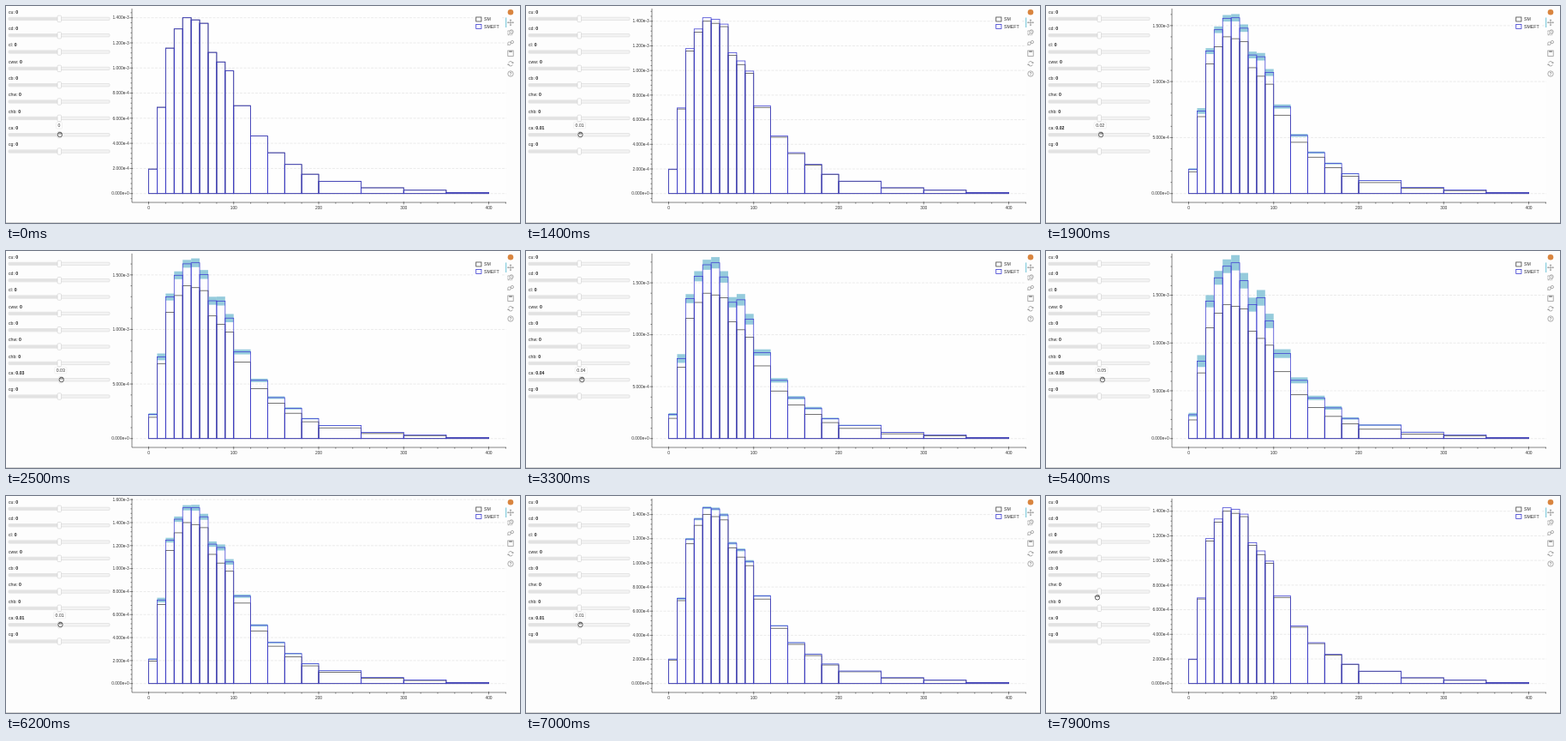
An HTML page with a canvas that plays this animation: 600 px wide and 253 px high, repeating every 8 s.

```html
<!DOCTYPE html>
<html lang="en">
<head>
<meta charset="utf-8">
<title>Coefficient sliders</title>
<style>
html, body { margin: 0; width: 100%; height: 100%; overflow: hidden; background: #fdfdfd; }
canvas { display: block; width: 600px; height: 253px; }
</style>
</head>
<body>
<canvas id="stage"></canvas>
<script>
const W = 600, H = 253, LOOP = 8000;
const FONT = '"Liberation Sans", Arial, sans-serif';
const canvas = document.getElementById('stage');
const ctx = canvas.getContext('2d');
const dpr = window.devicePixelRatio || 1;
canvas.width = W * dpr;
canvas.height = H * dpr;

const LEFT = 147, RIGHT = 584, TOP = 3, BOTTOM = 229, BASE = 218.7;
const BLUE = '#3c3cd2', DARK = '#444', BAND = '#95cbdc';
const EDGES = [0, 10, 20, 30, 40, 50, 60, 70, 80, 90, 100, 120, 140, 160, 180, 200, 250, 300, 350, 400];
// Bin heights in units of 1e-3, relative growth and band half-width at full strength
const SM = [.195, .687, 1.158, 1.311, 1.4, 1.383, 1.356, 1.124, 1.048, .977, .7, .458, .325, .232, .154, .098, .046, .027, .009];
const GAIN = [.28, .18, .241, .283, .288, .33, .218, .247, .405, .26, .27, .33, .31, .385, .37, .44, .45, .4, .35];
const SPREAD = [.1, .09, .055, .055, .051, .058, .06, .065, .078, .077, .065, .068, .07, .08, .08, .08, .08, .08, .08];

const NAMES = ['cu', 'cd', 'cl', 'cww', 'cb', 'chw', 'chb', 'ca', 'cg'];
const ACTIVE = 7;

// [time, slider value, strength shown in the plot]
const STEPS = [
  [0, 0, 0], [900, .01, 0], [1100, .01, .07], [1800, .02, .2], [1900, .02, .41],
  [2500, .03, .5], [2900, .03, .56], [3100, .04, .62], [3300, .04, .68], [3500, .04, .74],
  [3900, .05, .8], [4100, .05, .86], [5000, .05, .93], [5300, .05, 1], [5800, .04, .86],
  [5900, .03, .68], [6000, .02, .5], [6100, .01, .4], [6200, .01, .32], [6500, .01, .2],
  [6900, .01, .14], [7100, 0, .07]
];

const px = v => 166.5 + v * .9925;

function line(x1, y1, x2, y2) {
  ctx.beginPath();
  ctx.moveTo(x1, y1);
  ctx.lineTo(x2, y2);
  ctx.stroke();
}

function text(s, x, y, size, align = 'left', bold = false) {
  ctx.font = (bold ? 'bold ' : '') + size + 'px ' + FONT;
  ctx.textAlign = align;
  ctx.fillText(s, x, y);
  return ctx.measureText(s).width;
}

function box(x, y, w, h, r, fill, stroke) {
  ctx.beginPath();
  ctx.roundRect(x, y, w, h, r);
  ctx.fillStyle = fill;
  ctx.fill();
  ctx.strokeStyle = stroke;
  ctx.stroke();
}

function ring(x, y, r) {
  ctx.beginPath();
  ctx.arc(x, y, r, 0, Math.PI * 2);
  ctx.stroke();
}

const trim = v => v ? v.toFixed(2) : '0';

function drawSliders(value) {
  NAMES.forEach((name, i) => {
    const y = 7 + i * 19.3, track = 14.9 + i * 19.33;
    const v = i === ACTIVE ? value : 0;
    const knob = 62.3 + v * 60;
    ctx.fillStyle = '#222';
    const w = text(name + ': ', 3, y + 1.8, 5.2);
    text(trim(v), 3 + w, y + 1.8, 5.2, 'left', true);
    ctx.lineWidth = .6;
    box(3, track - 1.7, 118, 3.4, 1, '#f3f3f3', '#d8d8d8');
    ctx.fillStyle = '#e2e2e2';
    ctx.fillRect(3.2, track - 1.4, knob - 3, 2.8);
    box(knob - 2.2, track - 3.7, 4.4, 7.4, 1, '#fff', '#cfcfcf');
  });
}

function drawPointer(x, y, held) {
  ctx.lineWidth = .8;
  box(x - 2.5, y - 2.6, 5, 5.2, 2.1, '#fff', '#333');
  ctx.lineWidth = .6;
  [-1, .2, 1.4].forEach(d => line(x + d, y - 2.3, x + d, y - .3));
  if (!held) line(x - 2.5, y - .4, x - 3.2, y - 1.4);
}

function drawAxes(scale, max) {
  const major = max > 1.55 ? .5 : .2;
  const limit = (BASE - TOP) / scale;
  const low = -(BOTTOM - BASE) / scale;
  ctx.lineWidth = .6;
  ctx.strokeStyle = '#dedede';
  ctx.setLineDash([3, 1.5]);
  for (let v = 0; v <= limit; v += major) {
    line(LEFT, BASE - v * scale, RIGHT, BASE - v * scale);
  }
  ctx.setLineDash([]);
  ctx.strokeStyle = ctx.fillStyle = '#333';
  line(LEFT, TOP, LEFT, BOTTOM);
  line(LEFT, BOTTOM, RIGHT, BOTTOM);

  const minor = major / 5;
  for (let k = Math.ceil(low / minor); k * minor <= limit; k++) {
    const y = BASE - k * minor * scale;
    if (k % 5) { line(LEFT - 1.5, y, LEFT, y); continue; }
    line(LEFT - 2.4, y, LEFT + 1, y);
    const v = k * minor;
    const label = !k ? '0.000e+0' : v < .999 ? (v * 10).toFixed(3) + 'e-4' : v.toFixed(3) + 'e-3';
    text(label, LEFT - 3.2, y + 1.7, 4.9, 'right');
  }
  for (let v = 0; v <= 420; v += 20) {
    const x = px(v);
    if (v % 100) { line(x, BOTTOM, x, BOTTOM + 1.5); continue; }
    line(x, BOTTOM - 1, x, BOTTOM + 2.4);
    text(String(v), x, BOTTOM + 7.6, 4.9, 'center');
  }
}

function drawBars(heights, scale, color) {
  ctx.lineWidth = .75;
  ctx.strokeStyle = color;
  heights.forEach((h, i) => {
    const x = px(EDGES[i]);
    ctx.strokeRect(x, BASE - h * scale, px(EDGES[i + 1]) - x, h * scale);
  });
}

function drawPlot(p) {
  const fit = SM.map((h, i) => h * (1 + GAIN[i] * p));
  const max = Math.max(...fit);
  const scale = 205 / max;
  ctx.fillStyle = '#fefefe';
  ctx.fillRect(LEFT, TOP, RIGHT - LEFT, BOTTOM - TOP);
  drawAxes(scale, max);
  drawBars(SM, scale, DARK);
  ctx.fillStyle = BAND;
  fit.forEach((h, i) => {
    const half = SM[i] * SPREAD[i] * p * scale;
    if (p < .1) return;
    const x = px(EDGES[i]);
    ctx.fillRect(x, BASE - h * scale - half, px(EDGES[i + 1]) - x, half * 2);
  });
  drawBars(fit, scale, BLUE);
}

function drawLegend() {
  ctx.fillStyle = '#fefefe';
  ctx.fillRect(545, 9, 34, 20);
  [['SM', DARK, 15.5], ['SMEFT', BLUE, 24]].forEach(([name, color, y]) => {
    ctx.lineWidth = .8;
    ctx.strokeStyle = color;
    ctx.strokeRect(548.7, y - 2.5, 6.2, 5);
    ctx.fillStyle = '#333';
    text(name, 558, y + 1.9, 5.2);
  });
}

function drawTools() {
  const x = 589;
  ctx.fillStyle = '#d9853f';
  ctx.beginPath();
  ctx.arc(x, 7.3, 3.3, 0, Math.PI * 2);
  ctx.fill();
  ctx.fillStyle = '#6bc3d6';
  ctx.fillRect(583.2, 13.5, 1, 11.5);

  ctx.strokeStyle = ctx.fillStyle = '#999';
  ctx.lineWidth = .8;
  // pan
  line(x - 3.5, 19.3, x + 3.5, 19.3);
  line(x, 15.8, x, 22.8);
  [[1, 0], [-1, 0], [0, 1], [0, -1]].forEach(([a, b]) => {
    ctx.beginPath();
    ctx.moveTo(x + a * 3.9, 19.3 + b * 3.9);
    ctx.lineTo(x + a * 2.4 + b * 1.3, 19.3 + b * 2.4 + a * 1.3);
    ctx.lineTo(x + a * 2.4 - b * 1.3, 19.3 + b * 2.4 - a * 1.3);
    ctx.fill();
  });
  // box zoom
  ctx.setLineDash([1, .7]);
  ctx.strokeRect(x - 3.2, 28.8, 5, 5);
  ctx.setLineDash([]);
  ring(x + 1, 30, 2.2);
  line(x - .6, 31.7, x - 2.8, 34);
  // wheel zoom
  ring(x - 1.5, 43.7, 1.8);
  ring(x + 1.9, 42, 1.6);
  line(x - 2.7, 45, x - 3.6, 46);
  // save
  ctx.strokeRect(x - 3.2, 52, 6.4, 6.4);
  ctx.fillRect(x - 1.8, 52, 3.6, 2);
  // reset
  [0, Math.PI].forEach(a => {
    ctx.beginPath();
    ctx.arc(x, 67.3, 2.7, a + .4, a + 2.9);
    ctx.stroke();
  });
  ctx.fillRect(x + 1.5, 65.5, 2, 1.4);
  ctx.fillRect(x - 3.5, 67.6, 2, 1.4);
  // help
  ring(x, 79, 3.2);
  text('?', x, 80.8, 5, 'center', true);
}

function render(t) {
  const [, value, strength] = STEPS.filter(s => s[0] <= t).pop();
  ctx.setTransform(dpr, 0, 0, dpr, 0, 0);
  ctx.fillStyle = '#fdfdfd';
  ctx.fillRect(0, 0, W, H);
  ctx.fillStyle = '#d2d2d2';
  ctx.fillRect(0, 252, W, 1);
  drawPlot(strength);
  drawLegend();
  drawTools();
  drawSliders(value);

  const held = t < 7400;
  if (held) {
    const x = 62 + value * 60;
    const w = value ? 14 : 7;
    ctx.lineWidth = .5;
    box(x - w / 2, 135.5, w, 7.4, 1, '#fff', '#e4e4e4');
    ctx.fillStyle = '#333';
    text(trim(value), x, 141, 5.2, 'center');
  }
  const away = Math.min(1, Math.max(0, (Math.floor(t / 100) * 100 - 7300) / 500));
  drawPointer(62.9 + value * 62 - 2.9 * away, 150 - 31.7 * away, held);
}

const start = performance.now();
function tick() {
  render((performance.now() - start) % LOOP);
  requestAnimationFrame(tick);
}
tick();
</script>
</body>
</html>
```
